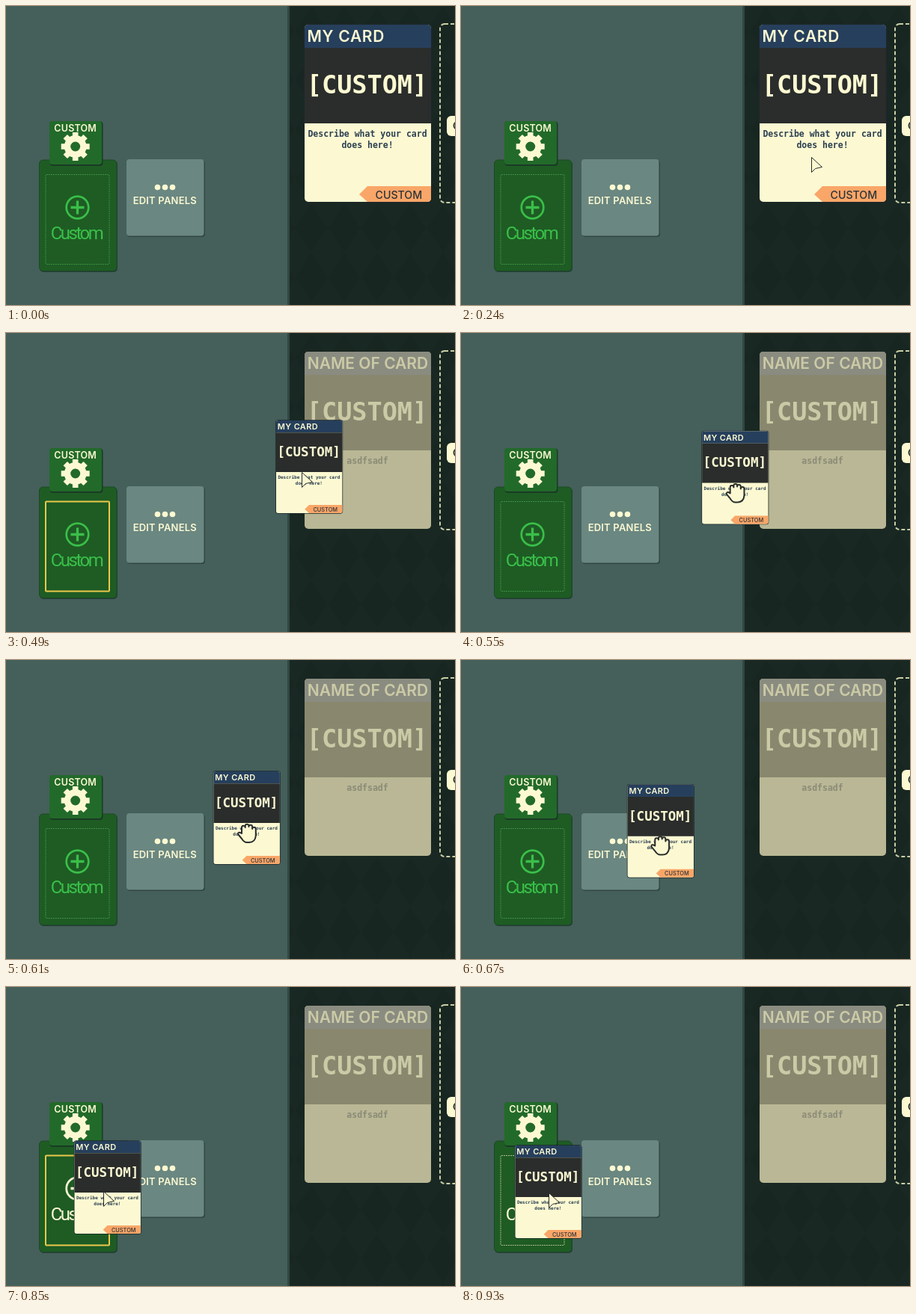
Animation, 600 px wide and 400 px high, one loop 1450 ms. Source, as an HTML page:

```html
<!DOCTYPE html>
<html lang="en">
<head>
<meta charset="utf-8">
<title>Dragging a card onto the deck</title>
<style>
html, body { margin: 0; width: 100%; height: 100%; overflow: hidden; background: #192823; }
svg { display: block; width: 600px; height: 400px; }
text { font-family: Inter, sans-serif; font-weight: 600; }
.title { font-size: 21px; }
.mono { font-family: "DejaVu Sans Mono", monospace; font-weight: 700; font-size: 11.5px; text-anchor: middle; }
.big { font-size: 33.5px; }
.mid { text-anchor: middle; }
.cream { fill: #fcf9d2; }
#deck { color: #3abf49; }
#deck.hover { color: #fcf9d2; }
#frame { fill: none; stroke: #418f46; stroke-dasharray: 2 1; }
.hover #frame { stroke: #b3bb8a; }
#deck.lit #frame { stroke: #ecc84b; stroke-width: 2; stroke-dasharray: none; }
</style>
</head>
<body>
<svg viewBox="0 0 600 400">
  <defs>
    <pattern id="argyle" width="44" height="66" x="386" y="0" patternUnits="userSpaceOnUse">
      <path d="M22 0L44 33 22 66 0 33Z" fill="#182621"/>
    </pattern>
    <g id="card">
      <rect width="169" height="237" rx="5" class="cream" stroke="#1d2729" stroke-width="3" paint-order="stroke"/>
      <path d="M0 31V5Q0 0 5 0H164Q169 0 169 5V31Z" fill="#263f5c"/>
      <path d="M0 31H169V132H0Z" fill="#2a2d2b"/>
      <path d="M73 227L84 216H169V232Q169 237 164 237H84Z" fill="#f9a668"/>
      <text class="title cream" x="3.5" y="23" letter-spacing=".7" font-weight="700">MY CARD</text>
      <text class="mono big cream" x="83.5" y="91.5">[CUSTOM]</text>
      <g fill="#2c4052">
        <text class="mono" x="84" y="150">Describe what your card</text>
        <text class="mono" x="84" y="165">does here!</text>
        <text x="94.5" y="232.5" fill="#2d3338" style="font-size:14.2px;font-weight:500">CUSTOM</text>
      </g>
    </g>
  </defs>

  <rect width="600" height="400" fill="#192823"/>
  <rect x="379" width="221" height="400" fill="url(#argyle)"/>
  <rect width="377" height="400" fill="#455f5a"/>
  <rect x="376" width="3" height="400" fill="#304843"/>

  <rect x="580" y="24" width="169" height="239" rx="6" fill="none" stroke="#c9cfa6" stroke-width="2" stroke-dasharray="5 3"/>
  <rect x="589" y="147" width="60" height="27" rx="6" class="cream"/>
  <circle cx="603.5" cy="160" r="5" fill="none" stroke="#263331" stroke-width="2"/>

  <g id="deck">
    <rect x="45" y="207" width="104" height="149" rx="5" fill="#263f38"/>
    <rect x="44.5" y="206" width="103.5" height="148.5" rx="5" fill="#1e5c24" stroke="#1b4a25"/>
    <rect id="frame" x="53" y="225.5" width="85" height="120" rx="1"/>
    <g fill="none" stroke="currentColor" stroke-width="2.7">
      <circle cx="95.5" cy="269.5" r="14.8"/>
      <path d="M86.500 269.500H104.500M95.500 260.500V278.500" stroke-width="3.3"/>
    </g>
    <text class="mid" x="94" y="312" fill="currentColor" letter-spacing="-2.5" style="font:400 24px Roboto,sans-serif">Custom</text>
    <rect x="58.5" y="154.5" width="71" height="59.5" rx="4" fill="#1b3a26"/>
    <rect x="58" y="154" width="70" height="58" rx="4" fill="#226a2a"/>
    <text class="mid cream" x="92.7" y="168" font-size="12.5" letter-spacing=".2">CUSTOM</text>
    <g transform="translate(92.7 188)" fill="none" stroke="#fcf9d2">
      <circle r="10.7" stroke-width="8.4"/>
      <g id="teeth" stroke-width="7.6"></g>
    </g>
  </g>

  <rect x="162" y="206.5" width="104" height="102.5" rx="4" fill="#304642"/>
  <rect x="161" y="205" width="103.5" height="102.5" rx="4" fill="#6a8781"/>
  <g class="cream">
    <circle cx="202.5" cy="242.5" r="3.8"/>
    <circle cx="212.5" cy="242.5" r="3.8"/>
    <circle cx="222.5" cy="242.5" r="3.8"/>
    <text class="mid" x="212.3" y="265" font-size="13" letter-spacing=".2">EDIT PANELS</text>
  </g>

  <use id="full" href="#card" x="399" y="25"/>
  <g id="empty" transform="translate(399 25)" fill="#cbcaa6">
    <rect width="169" height="237" rx="5" fill="#b9b795"/>
    <path d="M0 132V5Q0 0 5 0H164Q169 0 169 5V132Z" fill="#89886f"/>
    <path d="M0 31V5Q0 0 5 0H164Q169 0 169 5V31Z" fill="#8a8c80"/>
    <text class="title mid" x="84.5" y="23">NAME OF CARD</text>
    <text class="mono big" x="83.5" y="91.5">[CUSTOM]</text>
    <text class="mono" x="84" y="150" fill="#8b8b77">asdfsadf</text>
  </g>

  <use id="drag" href="#card"/>
  <g id="pointer" class="cream" stroke="#292d2b" stroke-linejoin="round">
    <path id="arrow" d="M.5 .5V20.5L5.500 15.500 14.500 13.500Z"/>
    <path id="hand" d="M4 13V5a2.35 2.35 0 0 1 4.7 0V3a2.35 2.35 0 0 1 4.7 0V4a2.35 2.35 0 0 1 4.7 0V7a2.35 2.35 0 0 1 4.7 0V16Q22 25 14 25H11Q7 25 4 20L-1 14Q-1 10 4 13Z" stroke-width="2"/>
  </g>
</svg>
<script>
const LOOP = 1450, LIFT = 390, HOVER = 800, DROP = 890;
const el = id => document.getElementById(id);
const show = (id, on) => el(id).style.display = on ? '' : 'none';

// Waypoints: time, x, y
const pointerPath = [
  [120, 452, 392], [180, 460, 300], [240, 468, 202], [310, 468, 178], [390, 452, 176],
  [490, 395, 186], [610, 311, 219], [750, 182, 256], [850, 130, 273], [930, 117, 275]
];
const cardPath = [
  [390, 414, 110], [490, 361, 117], [610, 277.5, 149], [750, 149.5, 189], [850, 91.5, 206], [930, 72.5, 212]
];

// Smooth curve through the waypoints, at rest after the last one
function along(path, t) {
  const last = path.length - 1;
  if (t <= path[0][0]) return path[0].slice(1);
  if (t >= path[last][0]) return path[last].slice(1);
  const i = path.findIndex(p => p[0] > t) - 1;
  const a = path[i], b = path[i + 1], span = b[0] - a[0], u = (t - a[0]) / span;
  const slope = (k, c) => {
    const p = path[Math.max(k - 1, 0)], q = path[Math.min(k + 1, last)];
    return k === last ? 0 : (q[c] - p[c]) / (q[0] - p[0]) * span;
  };
  return [1, 2].map(c =>
    a[c] * (1 + 2 * u) * (1 - u) ** 2 + slope(i, c) * u * (1 - u) ** 2 +
    b[c] * u * u * (3 - 2 * u) + slope(i + 1, c) * u * u * (u - 1));
}

function draw(t) {
  t = t < 250 ? Math.floor(t / 20) * 20 : Math.floor((t + 10) / 20) * 20 - 10;
  const held = t >= LIFT, grip = t >= 550 && t < 680;
  show('full', !held);
  show('empty', held);
  show('drag', held);
  show('pointer', t >= 120);
  show('arrow', !grip);
  show('hand', grip);
  el('deck').classList.toggle('lit', held && !grip && t < DROP);
  el('deck').classList.toggle('hover', t >= HOVER);
  el('pointer').setAttribute('transform', `translate(${along(pointerPath, t)})`);
  el('drag').setAttribute('transform', `translate(${along(cardPath, t)}) scale(.523)`);
}

el('teeth').innerHTML = Array.from({ length: 8 }, (_, i) =>
  `<path d="M0 -12V-19" transform="rotate(${i * 45})"/>`).join('');

function tick() {
  draw(performance.now() % LOOP);
  requestAnimationFrame(tick);
}
tick();
</script>
</body>
</html>
```
